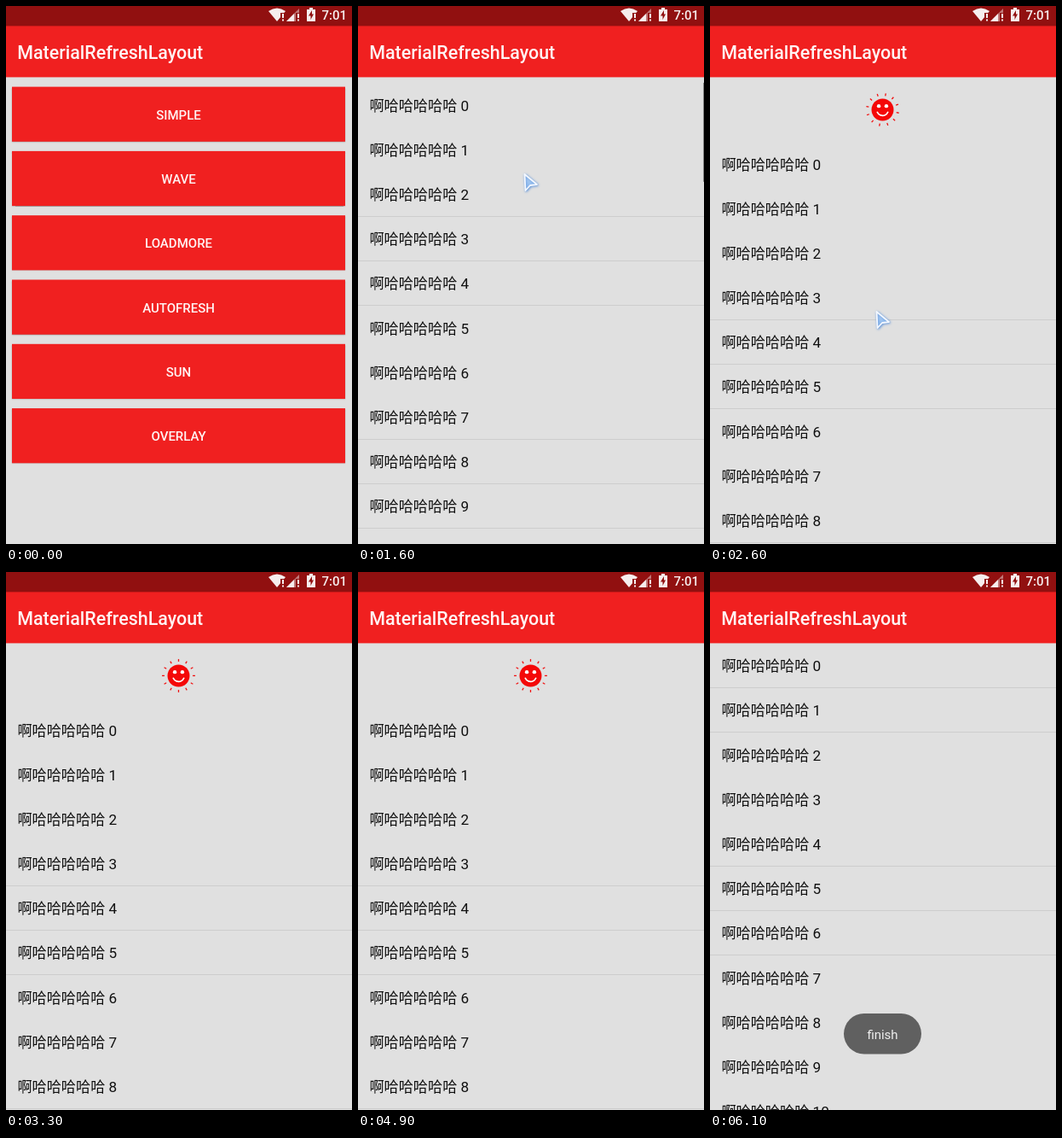
Recreate the animation shown at these times as an HTML page with a canvas. Size 406 px wide and 630 px high, loop 6.3 s.

```html
<!DOCTYPE html>
<html lang="zh">
<head>
<meta charset="utf-8">
<style>
  html, body { margin: 0; width: 100%; height: 100%; overflow: hidden; background: #e0e0e0; }
  canvas { display: block; }
</style>
</head>
<body>
<canvas id="stage" width="406" height="630"></canvas>
<script>
const W = 406, H = 630, LOOP = 6300, STEP = 100;
const RED = '#f02020', PAPER = '#e0e0e0';
const STATUS_BOTTOM = 23.4, BAR_BOTTOM = 83.4, ROW = 52.18, HEAD = 75.28, MID = 202.5;
const ctx = document.getElementById('stage').getContext('2d');
const menu = document.createElement('canvas');
menu.width = W;
menu.height = H;

// Keys: [time, value, value...]
const CURSOR = [
  [100, 38, 437], [300, 38, 437], [400, 80, 424], [500, 111, 411], [900, 111, 411],
  [1000, 139, 355], [1200, 176, 250], [1400, 193, 186], [1500, 194, 184],
  [1600, 194, 197], [1800, 194, 197], [1900, 194, 238], [2000, 194, 285],
  [2100, 194, 325], [2200, 194, 348], [2300, 194, 358], [2700, 194, 358]
];
const PULL = [
  [1500, 0], [1600, 6.46], [1800, 6.46], [1900, 24], [2000, 45.5], [2100, 65.6],
  [2200, 77], [2300, 82], [2400, 82], [2500, 77], [2600, HEAD],
  [5500, HEAD], [5600, 19], [5700, 0]
];

const clamp = v => Math.max(0, Math.min(1, v));

function sample(keys, t) {
  const next = keys.findIndex(k => k[0] >= t);
  if (next < 0) return keys.at(-1).slice(1);
  if (next === 0) return keys[0].slice(1);
  const a = keys[next - 1], b = keys[next], f = (t - a[0]) / (b[0] - a[0]);
  return a.slice(1).map((v, i) => v + (b[i + 1] - v) * f);
}

function rect(g, color, x, y, w, h) {
  g.fillStyle = color;
  g.fillRect(x, y, w, h);
}

function text(g, str, x, y, size, color, weight = 400, align = 'left') {
  g.font = `${weight} ${size}px Roboto, "Noto Sans CJK SC", "Noto Sans CJK", sans-serif`;
  g.textAlign = align;
  g.fillStyle = color;
  g.fillText(str, x, y);
}

function shape(g, color, path) {
  g.fillStyle = color;
  g.fill(new Path2D(path));
}

function disc(g, color, x, y, r) {
  g.fillStyle = color;
  g.beginPath();
  g.arc(x, y, r, 0, 7);
  g.fill();
}

function titleBar(g) {
  rect(g, RED, 0, 0, W, BAR_BOTTOM);
  text(g, 'MaterialRefreshLayout', 13.2, 62, 21.45, '#fff4f4', 500);
}

function statusBar(g) {
  const ink = '#f6eeee', back = '#911010';
  rect(g, back, 0, 0, W, STATUS_BOTTOM);
  shape(g, ink, 'M308 6Q318 -1 328 6L318 18Z');
  rect(g, back, 322, 8, 6, 10);
  rect(g, ink, 324, 9, 2, 5);
  rect(g, ink, 324, 15.5, 2, 2);
  shape(g, '#c07a7a', 'M329 18L344 3V18Z');
  shape(g, ink, 'M329 18L338 9V18Z');
  rect(g, back, 340, 8, 4, 10);
  rect(g, ink, 342, 9, 2, 5);
  rect(g, ink, 342, 15.5, 2, 2);
  shape(g, ink, 'M353 4H356V2H360V4H363V18H353Z');
  shape(g, back, 'M359 5L355 11.5H357.5V16L361 9.5H359Z');
  text(g, '7:01', 400, 16, 15, ink, 500, 'right');
}

function drawMenu(g) {
  rect(g, PAPER, 0, 0, W, H);
  ['SIMPLE', 'WAVE', 'LOADMORE', 'AUTOFRESH', 'SUN', 'OVERLAY'].forEach((label, i) => {
    const y = 94.6 + i * 75.3;
    g.shadowColor = 'rgba(0,0,0,.3)';
    g.shadowBlur = 1.5;
    g.shadowOffsetY = 1;
    rect(g, RED, 7, y, 391, 64.2);
    g.shadowColor = 'transparent';
    text(g, label, MID, y + 38.2, 15, '#fff4f4', 500, 'center');
  });
  titleBar(g);
  statusBar(g);
}

function drawSun(t, pull) {
  const f = clamp(pull / HEAD), r = 13 * f * f;
  if (r < 0.3) return;
  ctx.save();
  ctx.translate(MID, BAR_BOTTOM + 0.4 + pull / 2);
  disc(ctx, '#f40808', 0, 0, r);
  for (const side of [-1, 1]) disc(ctx, '#fff', side * r * 0.34, -r * 0.33, r * 0.17);
  ctx.strokeStyle = '#fff';
  ctx.lineWidth = r * 0.13;
  ctx.beginPath();
  ctx.arc(0, 0, r * 0.53, 0.35, Math.PI - 0.35);
  ctx.stroke();
  if (f === 1) {
    ctx.rotate(Math.max(0, t - 2500) * 0.1125 * Math.PI / 180);
    ctx.strokeStyle = '#f01010';
    ctx.lineWidth = 1.3;
    for (let i = 0; i < 12; i++) {
      ctx.beginPath();
      ctx.moveTo(0, -16.5);
      ctx.lineTo(0, -19.5);
      ctx.stroke();
      ctx.rotate(Math.PI / 6);
    }
  }
  ctx.restore();
}

function drawList(t, pull, slide) {
  rect(ctx, PAPER, 0, 0, W, H);
  for (let i = 0; i < 11; i++) {
    const line = 135.3 + slide + pull + i * ROW;
    text(ctx, '啊哈哈哈哈哈 ' + i, 13.4, line - 19, 17.17, '#101010');
    // Hairlines vanish between pixel rows of the scaled screen
    if (line % 1 < 0.5) rect(ctx, '#cdcdcd', 0, Math.floor(line), W, 1);
  }
  ctx.globalAlpha = clamp((2150 - t) / 300);
  rect(ctx, '#858585', 405, BAR_BOTTOM + slide + pull, 1, 116);
  ctx.globalAlpha = 1;
  drawSun(t, pull);
  ctx.save();
  ctx.translate(0, slide);
  titleBar(ctx);
  ctx.restore();
  statusBar(ctx);
}

function drawToast(alpha) {
  ctx.globalAlpha = alpha;
  ctx.fillStyle = '#606060';
  ctx.beginPath();
  ctx.roundRect(157, 517, 91, 47.5, 23.7);
  ctx.fill();
  text(ctx, 'finish', MID, 546.5, 15, '#eee', 400, 'center');
  ctx.globalAlpha = 1;
}

function drawCursor(x, y) {
  ctx.save();
  ctx.translate(x, y);
  const arrow = new Path2D('M1.5 0L16 12L8 13L2.5 19Z');
  const fill = ctx.createLinearGradient(0, 0, 10, 16);
  fill.addColorStop(0, '#c4dcf8');
  fill.addColorStop(1, '#8ab8ee');
  ctx.lineJoin = 'round';
  ctx.shadowColor = '#5f93d8';
  ctx.shadowBlur = 3;
  ctx.shadowOffsetX = ctx.shadowOffsetY = 0.8;
  ctx.fillStyle = fill;
  ctx.fill(arrow);
  ctx.strokeStyle = '#f4f8ff';
  ctx.lineWidth = 1.8;
  ctx.stroke(arrow);
  ctx.restore();
}

function render(t) {
  // The new screen fades and slides in over the menu
  const opened = t - 945.3;
  if (opened < 0) {
    ctx.drawImage(menu, 0, 0);
  } else {
    const slide = H * 0.08 * (1 - clamp(opened / 350)) ** 5;
    drawList(t, sample(PULL, t)[0], slide);
    ctx.globalAlpha = (1 - clamp(opened / 200)) ** 4;
    ctx.drawImage(menu, 0, 0);
    ctx.globalAlpha = 1;
  }
  if (t >= 5700) drawToast(clamp((t - 5600) / 500));
  if (t >= 100 && t < 2800) drawCursor(...sample(CURSOR, t));
}

drawMenu(menu.getContext('2d'));
const start = performance.now();
function tick() {
  const t = (performance.now() - start) % LOOP;
  render(Math.floor(t / STEP) * STEP);
  requestAnimationFrame(tick);
}
tick();
</script>
</body>
</html>
```
